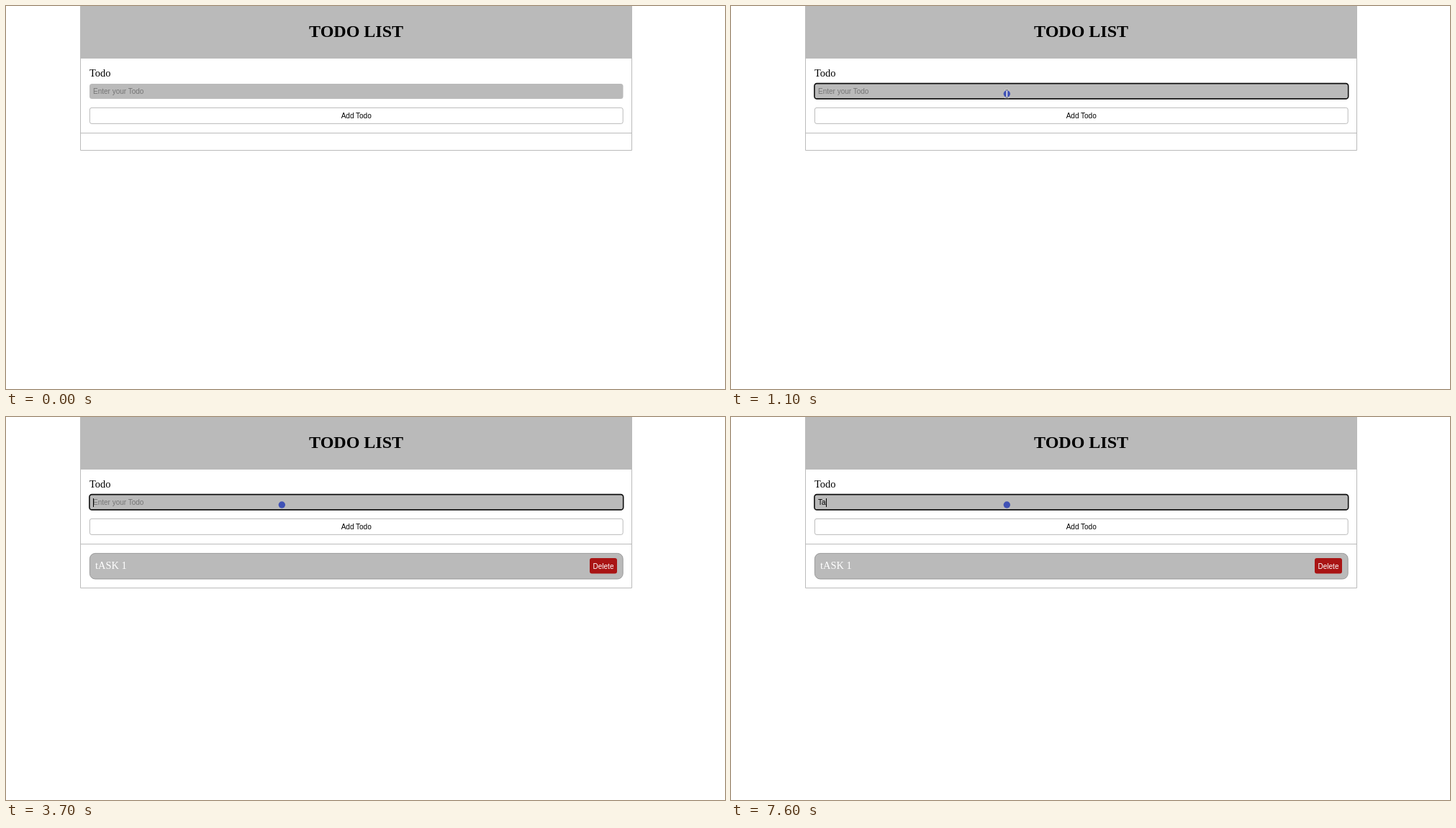
Recreate the animation shown at these times as an HTML page. Size 999 by 532 pixels, loop 8000 ms.

```html
<!DOCTYPE html>
<html lang="en">
<head>
<meta charset="utf-8">
<title>Todo list</title>
<style>
  html, body { margin: 0; width: 100%; height: 100%; overflow: hidden; background: #fff; }
  svg { display: block; width: 999px; height: 532px; }
  text { white-space: pre; }
  .serif { font: 14.4px "Liberation Serif", "Times New Roman", serif; }
  .sans { font: 10px "Liberation Sans", Arial, sans-serif; }
  .title { font-size: 24px; font-weight: bold; }
  .mid { text-anchor: middle; }
  .line { fill: none; stroke: #bbb; }
</style>
</head>
<body>
<svg viewBox="0 0 999 532">
  <rect x="103" width="767" height="73" fill="#bababa"/>
  <text class="serif title mid" x="486.6" y="43">TODO LIST</text>
  <path class="line" id="frame"/>
  <path class="line" d="M103 176.5H870"/>

  <text class="serif" x="116" y="98">Todo</text>
  <rect x="116" y="108" width="741.5" height="21" rx="3.5" fill="#bababa"/>
  <rect id="focus" x="115.9" y="107.6" width="741.8" height="21.3" rx="3.5" fill="none" stroke="#101010" stroke-width="1.6"/>
  <text class="sans" id="hint" x="121" y="122" fill="#757575">Enter your Todo</text>
  <text class="sans" id="typed" x="121" y="122"></text>
  <path id="squiggle" fill="none" stroke="#e03030" stroke-width=".9"/>
  <rect id="caret" y="113" width="1" height="12"/>

  <rect x="116.4" y="141.4" width="740.8" height="22" rx="2.6" fill="#fff" stroke="#aaa" stroke-width=".8"/>
  <text class="sans mid" x="486.7" y="156">Add Todo</text>

  <g id="item">
    <rect x="116.4" y="189.4" width="740.8" height="35.6" rx="7.5" fill="#bababa" stroke="#8a8a8a" stroke-width=".8"/>
    <text class="serif" x="124" y="211" fill="#fff">tASK 1</text>
    <rect x="811" y="196" width="38" height="21.5" rx="3" fill="#a91414"/>
    <text class="sans mid" x="830" y="211" fill="#fff">Delete</text>
  </g>

  <circle id="ring" fill="none" stroke="#3f51b5" stroke-width="3"/>
  <g id="pointer">
    <circle id="dot" r="4.7"/>
    <g id="beam" fill="none">
      <path d="M-3 -5.6H3M-3 5.6H3" stroke="#ddd" stroke-width="1.5"/>
      <path d="M0 -4V4" stroke="#e4e4e4" stroke-width="1.7"/>
      <path d="M-2 -5.5H2M-2 5.5H2" stroke="#666" stroke-width=".7"/>
    </g>
  </g>
</svg>
<script>
const LOOP = 8000, ADDED = 2900;
const el = id => document.getElementById(id);
const show = (id, on) => el(id).style.display = on ? "" : "none";

// [start ms, input text, caret visible]
const input = [
  [0, "", 0], [600, "", 1], [1100, "", 0], [1600, "", 1],
  [1700, "t", 1], [2000, "tA", 1], [2100, "tAS", 1], [2200, "tASK", 1],
  [2300, "tASK ", 1], [2500, "tASK 1", 1],
  [ADDED, "", 1], [3100, "", 0], [3700, "", 1], [4300, "", 0],
  [4800, "t", 1], [5400, "t", 0], [5500, "", 1], [6000, "", 0],
  [6600, "", 1], [7200, "", 0], [7400, "T", 1], [7600, "Ta", 1]
];

// [start ms, x, y]
const pointer = [
  [100, 428, 523], [200, 420, 440], [300, 408, 320], [400, 395, 208],
  [500, 383, 140], [600, 380.5, 127], [800, 381, 125], [900, 382, 123], [1000, 383.3, 122]
];

// [start ms, x, y, radius, opacity]
const ring = [
  [600, 379, 129, 12, .7], [700, 379, 128.5, 16, .85], [800, 379, 127.5, 16, .75],
  [900, 379.5, 126, 15.5, .5], [1000, 380, 126, 15.5, .2]
];

const stepAt = (steps, t) => steps.findLast(s => s[0] <= t);

let wave = "M121 125";
for (let x = 122; x <= 145; x++) wave += `L${x} ${x % 2 ? 125 : 123.8}`;
el("squiggle").setAttribute("d", wave);

function set(id, attrs) {
  for (const name in attrs) el(id).setAttribute(name, attrs[name]);
}

function drawInput(t) {
  const [, text, caretOn] = stepAt(input, t);
  el("typed").textContent = text;
  const width = text ? el("typed").getComputedTextLength() : 0;
  set("caret", { x: Math.round(121 + width) });
  show("hint", !text);
  show("caret", caretOn);
  show("squiggle", text.startsWith("tASK "));
  show("focus", t >= 600);
}

function drawPointer(t) {
  const pos = stepAt(pointer, t);
  show("pointer", pos);
  if (pos) set("pointer", { transform: `translate(${pos[1]} ${pos[2]})` });
  set("dot", { fill: t >= ADDED && t < 3000 ? "#484848" : "#3f51b5" });
  show("beam", t >= 600 && t < 3000);

  const pulse = t < 1100 && stepAt(ring, t);
  show("ring", pulse);
  if (pulse) {
    const [, cx, cy, r, opacity] = pulse;
    set("ring", { cx, cy, r, opacity });
  }
}

function draw(now) {
  const t = now % LOOP;
  const added = t >= ADDED;
  set("frame", { d: `M103.5 73V${added ? 237.5 : 200.5}H869.5V73` });
  show("item", added);
  drawInput(t);
  drawPointer(t);
}

const start = performance.now();
function tick() {
  draw(performance.now() - start);
  requestAnimationFrame(tick);
}
tick();
</script>
</body>
</html>
```
